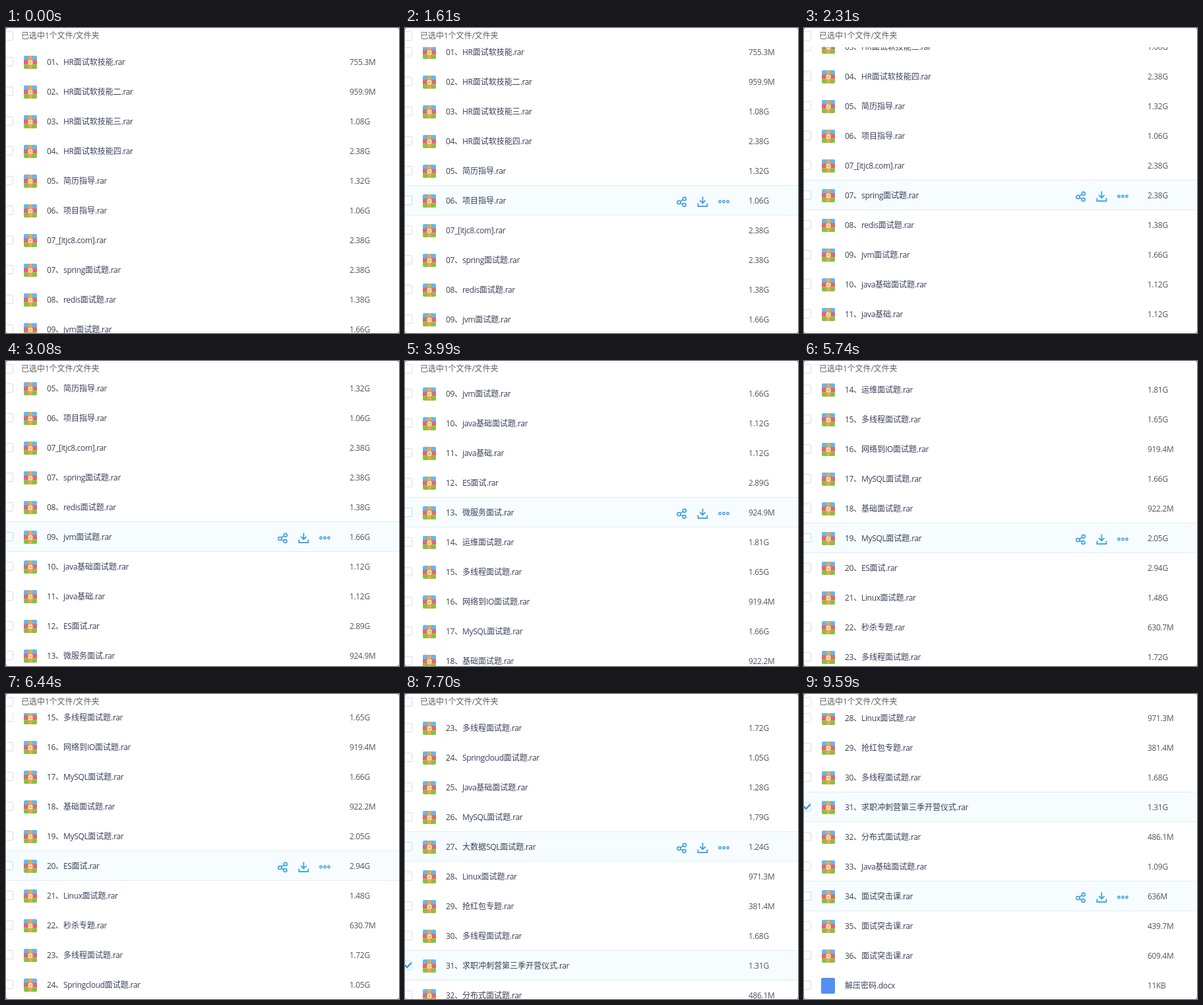
An HTML page that plays this animation: 596x462 px, repeating every 9.66 s.

```html
<!DOCTYPE html>
<html lang="zh-CN">
<head>
<meta charset="utf-8">
<title>文件列表</title>
<style>
html, body { margin: 0; width: 100%; height: 100%; overflow: hidden; background: #666; }
#stage {
  position: relative; width: 596px; height: 462px; overflow: hidden;
  background: #fff; border-radius: 3px;
  font: 12px/45px "Open Sans", "Noto Sans", "Noto Sans CJK SC", sans-serif;
  letter-spacing: -.35px; color: #384158; white-space: nowrap;
}
#stage i { font: 12px/1 "Noto Sans CJK SC", "Noto Sans CJK", sans-serif; letter-spacing: 0; }
#head { position: absolute; left: 0; top: 0; width: 100%; height: 29px; color: #606060; }
#head span { position: absolute; left: 23px; top: -11px; }
#view { position: absolute; left: 0; top: 29px; width: 100%; bottom: 0; overflow: hidden; }
#list { position: absolute; left: 0; top: -1px; width: 100%; }
.row {
  position: absolute; left: 0; width: 100%; height: 46px; box-sizing: border-box;
  border: solid transparent; border-width: 1px 0;
}
.row.on, .row.hover { background: #f6fcff; border-color: #dfedf3; }
.row.hover { z-index: 1; }
.row span, .row svg, .box { position: absolute; }
.name { left: 62px; top: 0; }
.size { left: 521px; top: 0; color: #53565e; }
.box {
  left: -4px; top: 15px; width: 13px; height: 12px;
  border: 1px solid #dcdfe3; border-radius: 2px; background: #fff;
}
.hover .box, .on .box { border-color: #cbdce5; }
#head .box { top: 5px; }
.icon { left: 26px; top: 12px; }
.tick { left: 0; top: 14px; }
.tools { left: 408px; top: 12px; visibility: hidden; }
.hover .tools { visibility: visible; }
</style>
</head>
<body>
<div id="stage">
  <div id="head"><div class="box"></div><span>已选中1个文件/文件夹</span></div>
  <div id="view"><div id="list"></div></div>
</div>
<script>
const LOOP = 9660, TICK = 70, ROW = 45;

const files = `01、HR面试软技能|755.3M
02、HR面试软技能二|959.9M
03、HR面试软技能三|1.08G
04、HR面试软技能四|2.38G
05、简历指导|1.32G
06、项目指导|1.06G
07_[itjc8.com]|2.38G
07、spring面试题|2.38G
08、redis面试题|1.38G
09、jvm面试题|1.66G
10、java基础面试题|1.12G
11、java基础|1.12G
12、ES面试|2.89G
13、微服务面试|924.9M
14、运维面试题|1.81G
15、多线程面试题|1.65G
16、网络到IO面试题|919.4M
17、MySQL面试题|1.66G
18、基础面试题|922.2M
19、MySQL面试题|2.05G
20、ES面试|2.94G
21、Linux面试题|1.48G
22、秒杀专题|630.7M
23、多线程面试题|1.72G
24、Springcloud面试题|1.05G
25、Java基础面试题|1.28G
26、MySQL面试题|1.79G
27、大数据SQL面试题|1.24G
28、Linux面试题|971.3M
29、抢红包专题|381.4M
30、多线程面试题|1.68G
31、求职冲刺营第三季开营仪式|1.31G
32、分布式面试题|486.1M
33、Java基础面试题|1.09G
34、面试突击课|636M
35、面试突击课|439.7M
36、面试突击课|609.4M
解压密码.docx|11KB`.split("\n").map(line => line.split("|"));
const CHECKED = 31;

const archive = `<svg class="icon" width="22" height="22">
  <path d="M1 8V3Q1 1 3 1H19Q21 1 21 3V8Z" fill="#66b8ea"/>
  <path d="M1 7.500H21V14.500H1Z" fill="#e86663"/>
  <path d="M1 14.500H21V19Q21 21 19 21H3Q1 21 1 19Z" fill="#84c244"/>
  <path d="M8.500 1H13.500V21H8.500Z" fill="#e9ab4c"/>
  <rect x="7.500" y="8" width="7" height="6.500" rx="1.500" fill="#f9dcb4"/>
  <rect x="9.500" y="10" width="3" height="2.500" rx=".8" fill="#eda763"/></svg>`;
const doc = `<svg class="icon" width="22" height="24" style="top:11px">
  <rect width="21" height="24" rx="2" fill="#5390f5"/></svg>`;
const tick = `<svg class="tick" width="12" height="16">
  <path d="M-1 7L3.300 11L9.500 4.200" fill="none" stroke="#2f9fe8" stroke-width="2.600"/></svg>`;
const tools = `<svg class="tools" width="90" height="24" fill="none" stroke="#2f9edd" stroke-width="1.500">
  <circle cx="7.500" cy="13" r="2.600"/><circle cx="15.800" cy="7.800" r="2.500"/><circle cx="15.500" cy="17" r="2.500"/>
  <path d="M9.800 11.600L13.400 9.200M10 14.100L13.100 15.800"/>
  <path d="M43.400 4.500V14M39.200 10.200L43.400 14.400L47.600 10.200M36.400 14.500V19.200H50.400V14.500" stroke-width="1.700"/>
  <circle cx="69.500" cy="12" r="1.700" stroke-width="1.400"/>
  <circle cx="75.500" cy="12" r="1.700" stroke-width="1.400"/>
  <circle cx="81.500" cy="12" r="1.700" stroke-width="1.400"/></svg>`;

const wrapHan = text => text.replace(/[、\u4e00-\u9fff]+/g, "<i>$&</i>");

const title = document.querySelector("#head span");
title.innerHTML = wrapHan(title.textContent);

const list = document.getElementById("list");
const rows = files.map(([name, size], i) => {
  const row = document.createElement("div");
  const isDoc = name.endsWith(".docx");
  row.className = i === CHECKED ? "row on" : "row";
  row.style.top = i * ROW + "px";
  row.innerHTML = `<div class="box"></div>${i === CHECKED ? tick : ""}${isDoc ? doc : archive}` +
    `<span class="name">${wrapHan(isDoc ? name : name + ".rar")}</span>${tools}<span class="size">${size}</span>`;
  list.append(row);
  return row;
});

// Scroll bursts: first tick, last tick, offset reached, acceleration power
const bursts = [
  [1330, 1820, 38, 2], [1960, 2520, 150, 1], [2870, 3220, 240, 2],
  [3360, 4130, 440, 1], [4410, 4550, 490, 1], [4690, 4690, 497, 1],
  [4970, 5390, 560, 2], [5600, 5810, 664, 1], [5950, 6090, 672, 1],
  [6230, 6580, 715, 2], [6860, 7770, 1060, 1], [7840, 7980, 1275, 1]
];

function scrollAt(t) {
  let y = 0;
  for (const [from, to, goal, power] of bursts) {
    if (t < from) break;
    const p = Math.min(1, (t - from + TICK) / (to - from + TICK));
    y += (goal - y) * p ** power;
  }
  return Math.round(y);
}

// Pointer height; it enters from below, rests, then moves down one row
function pointerAt(t) {
  if (t < 910) return null;
  if (t < 1190) return 410 - (t - 910) / 280 * 162;
  return t < 8260 ? 248 : 300;
}

let start = null, hovered = null;
function draw(now) {
  start ??= now;
  const t = Math.floor((now - start) % LOOP / TICK) * TICK;
  const y = scrollAt(t), pointer = pointerAt(t);
  list.style.transform = `translateY(${-y}px)`;
  const next = pointer === null ? null : rows[Math.floor((pointer + y - 29) / ROW)];
  if (next !== hovered) {
    hovered?.classList.remove("hover");
    next?.classList.add("hover");
    hovered = next;
  }
  requestAnimationFrame(draw);
}
requestAnimationFrame(draw);
</script>
</body>
</html>
```
